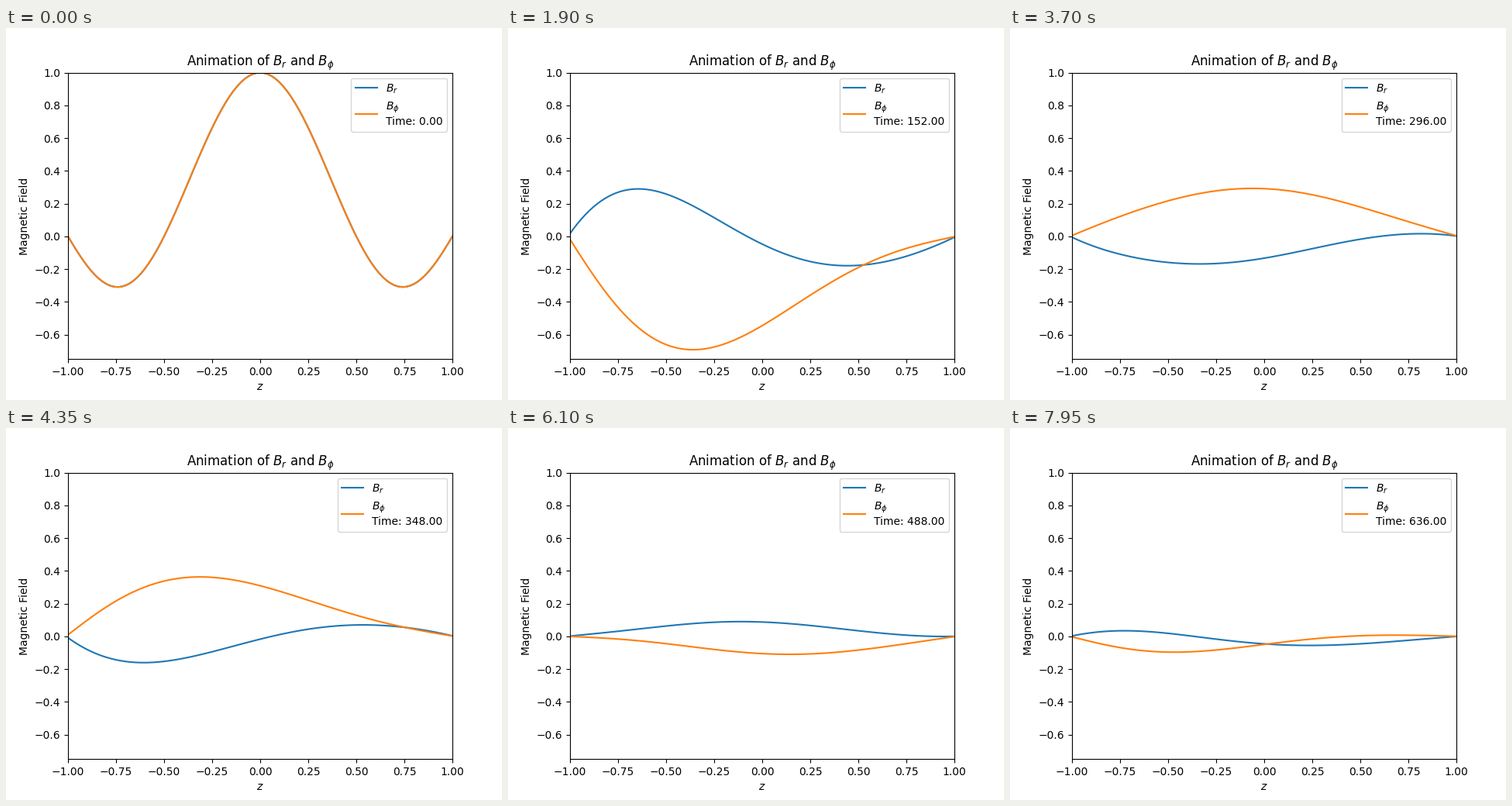
Animation of 640x480 px, one loop 8 s. Source, as a matplotlib script:

```python
import numpy as np
import matplotlib.pyplot as plt
from matplotlib.animation import FuncAnimation

# Alpha-omega dynamo:
#   dBr/dt   = -ALPHA dBphi/dz + ETA d2Br/dz2
#   dBphi/dt =  SHEAR Br       + ETA d2Bphi/dz2
ALPHA, SHEAR, ETA = 0.0105, -0.0403, 0.00365
N = 101
FRAMES, INTERVAL = 160, 50
TIME_STEP, SUBSTEPS = 4.0, 80

z = np.linspace(-1, 1, N)
dz = z[1] - z[0]


def evolution_matrix():
    """Matrix that advances (Br, Bphi) by one TIME_STEP."""
    eye = np.eye(N)
    up, down = np.eye(N, k=1), np.eye(N, k=-1)
    grad = (up - down) / (2 * dz)
    lap = (up - 2 * eye + down) / dz**2
    # antisymmetric ghost cells at both ends
    grad[0, 0], grad[-1, -1] = 1 / (2 * dz), -1 / (2 * dz)
    lap[0, 0] = lap[-1, -1] = -3 / dz**2
    rhs = np.block([[ETA * lap, -ALPHA * grad], [SHEAR * eye, ETA * lap]])
    h = rhs * TIME_STEP / SUBSTEPS
    one = np.eye(2 * N)
    rk4 = one + h @ (one + h / 2 @ (one + h / 3 @ (one + h / 4)))
    return np.linalg.matrix_power(rk4, SUBSTEPS)


def solve():
    start = (1 - z**2) * np.cos(np.pi * z)
    states = [np.concatenate([start, start])]
    step = evolution_matrix()
    for _ in range(FRAMES - 1):
        states.append(step @ states[-1])
    return np.array(states).reshape(FRAMES, 2, N)


fields = solve()

fig, ax = plt.subplots(figsize=(6.4, 4.8), dpi=100)
line_r, = ax.plot(z, fields[0, 0], label=r"$B_r$")
line_phi, = ax.plot(z, fields[0, 1])
ax.set_xlim(-1, 1)
ax.set_ylim(-0.75, 1)
ax.set_xlabel("$z$")
ax.set_ylabel("Magnetic Field")
ax.set_title(r"Animation of $B_r$ and $B_\phi$")


def update(i):
    line_r.set_ydata(fields[i, 0])
    line_phi.set_ydata(fields[i, 1])
    line_phi.set_label(f"$B_\\phi$\nTime: {i * TIME_STEP:.2f}")
    legend = ax.legend(loc="upper right")
    return line_r, line_phi, legend


anim = FuncAnimation(fig, update, frames=FRAMES, interval=INTERVAL,
                     repeat=True, repeat_delay=0)
plt.show()
```
